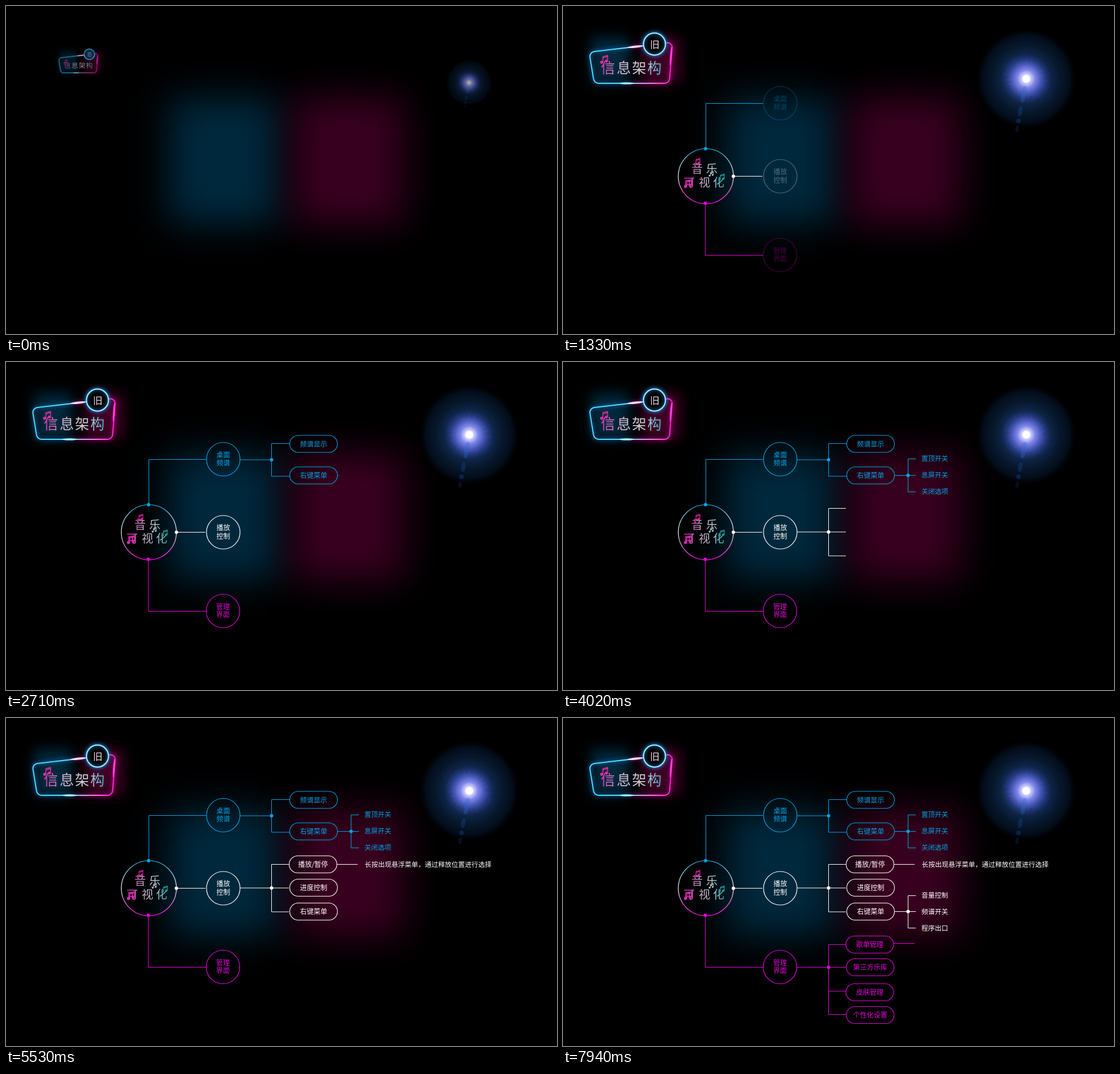
An HTML page with a canvas that plays this animation: 970x577 px, repeating every 8 s.

```html
<!DOCTYPE html>
<html lang="zh-CN">
<head>
<meta charset="utf-8">
<style>
html, body { margin: 0; width: 970px; height: 577px; overflow: hidden; background: #000; }
body { position: relative; }
canvas { position: absolute; left: 0; top: 0; }
.glow { position: absolute; top: 162px; width: 194px; height: 221px; filter: blur(32px); }
</style>
</head>
<body>
<div class="glow" style="left:286px;background:#00283c"></div>
<div class="glow" style="left:506px;background:#400024e0"></div>
<canvas id="stage" width="970" height="577"></canvas>
<script>
const ctx = document.getElementById('stage').getContext('2d');
const LOOP = 8000, FADE = 489, WIPE = 450, TAU = Math.PI * 2;
const BLUE = '#00a4e8', WHITE = '#ffffff', PINK = '#e600dc';
const FONT = '"Noto Sans CJK SC", "Noto Sans CJK", "Noto Sans", sans-serif';

const progress = (t, start, length) => Math.min(1, Math.max(0, (t - start) / length));

function gradient(x0, y0, x1, y1, ...colors) {
  const g = ctx.createLinearGradient(x0, y0, x1, y1);
  colors.forEach((c, i) => g.addColorStop(i / (colors.length - 1), c));
  return g;
}

function disc(x, y, r, fill) {
  ctx.fillStyle = fill;
  ctx.beginPath();
  ctx.arc(x, y, r, 0, TAU);
  ctx.fill();
}

function ring(x, y, r, stroke, width = 1.2) {
  ctx.strokeStyle = stroke;
  ctx.lineWidth = width;
  ctx.beginPath();
  ctx.arc(x, y, r, 0, TAU);
  ctx.stroke();
}

function text(str, x, y, fill, size = 11.75, align = 'center', weight = 400) {
  ctx.font = `${weight} ${size}px ${FONT}`;
  ctx.textAlign = align;
  ctx.textBaseline = 'alphabetic';
  ctx.fillStyle = fill;
  ctx.fillText(str, x, y + size * 0.37);
}

const spaced = (str, xs, y, fill, size) =>
  [...str].forEach((c, i) => text(c, xs[i], y, fill, size));

// Pair of beamed quavers centred on x, y
function note(x, y, s, color) {
  disc(x - s * 0.4, y + s * 0.5, s * 0.24, color);
  disc(x + s * 0.35, y + s * 0.3, s * 0.24, color);
  ctx.strokeStyle = color;
  ctx.lineWidth = s * 0.14;
  ctx.beginPath();
  ctx.moveTo(x - s * 0.2, y + s * 0.5);
  ctx.lineTo(x - s * 0.2, y - s * 0.4);
  ctx.lineTo(x + s * 0.55, y - s * 0.6);
  ctx.lineTo(x + s * 0.55, y + s * 0.3);
  ctx.moveTo(x - s * 0.2, y - s * 0.2);
  ctx.lineTo(x + s * 0.55, y - s * 0.4);
  ctx.stroke();
}

// Entrance that grows around a point while fading in
function zoom(p, x, y, draw) {
  if (p <= 0) return;
  const s = p ** 1.6;
  ctx.save();
  ctx.globalAlpha = p;
  ctx.translate(x, y);
  ctx.scale(s, s);
  ctx.translate(-x, -y);
  draw(s);
  ctx.restore();
}

function fade(p, draw) {
  if (p <= 0) return;
  ctx.save();
  ctx.globalAlpha = p;
  draw();
  ctx.restore();
}

// Left-to-right reveal: a paint that ends softly at the moving front
function wipe(p, x0, x1, color, lines, dot) {
  if (p <= 0) return;
  const front = x0 + (x1 - x0 + 6) * p;
  const paint = gradient(front - 6, 0, front, 0, color, color + '00');
  ctx.strokeStyle = paint;
  ctx.lineWidth = 1;
  ctx.beginPath();
  for (const [x, y, ...rest] of lines) {
    ctx.moveTo(x, y);
    for (let i = 0; i < rest.length; i += 2) ctx.lineTo(rest[i], rest[i + 1]);
  }
  ctx.stroke();
  if (dot) disc(...dot, 3, paint);
}

// Stem from x0 to a vertical bar, with one twig for each y
function branch(p, x0, stemY, barX, x1, ys, color) {
  const lines = ys.map(y => [barX, y, x1, y]);
  lines.push([x0, stemY, barX, stemY], [barX, ys[0], barX, ys[ys.length - 1]]);
  wipe(p, x0, x1, color, lines, [barX, stemY]);
}

function flare(x, y, length, thick, angle, color) {
  ctx.fillStyle = color;
  ctx.beginPath();
  ctx.ellipse(x, y, length, thick, angle, 0, TAU);
  ctx.fill();
}

function title(s) {
  ctx.filter = `blur(${11 * s}px)`;
  ctx.fillStyle = '#00283c';
  ctx.fillRect(50, 55, 66, 80);
  ctx.fillStyle = '#400024';
  ctx.fillRect(140, 55, 66, 80);
  ctx.filter = 'none';

  const neon = gradient(46, 0, 193, 0, '#4fdcff', '#4fdcff', '#6fe0ff', '#ff7be8', '#ff18d8');
  const path = () => {
    ctx.beginPath();
    ctx.moveTo(141, 70);
    ctx.arcTo(46, 81, 55, 136, 9);
    ctx.arcTo(55, 136, 187, 136, 9);
    ctx.arcTo(187, 136, 193, 64, 9);
    ctx.arcTo(193, 64, 181, 65, 8);
    ctx.lineTo(181, 65);
    ctx.stroke();
  };
  ctx.strokeStyle = neon;
  ctx.lineWidth = 2;
  for (const [x, width, glow] of [[0, 120, '#0090ff'], [120, 110, '#ff00c0']]) {
    ctx.save();
    ctx.beginPath();
    ctx.rect(x, 30, width, 125);
    ctx.clip();
    ctx.shadowColor = glow;
    ctx.shadowBlur = 7 * s;
    path();
    ctx.restore();
  }
  flare(128, 71.5, 15, 2, -0.11, '#ffd8f4');
  flare(112, 136, 13, 1.7, 0, '#a8f4ff');
  flare(190, 88, 17, 1.6, 1.65, '#ff40dc');

  ctx.save();
  ctx.shadowColor = '#00a8ff';
  ctx.shadowBlur = 7 * s;
  disc(161, 67, 19, '#000');
  ring(161, 67, 19.3, '#98e8ff', 2.2);
  ctx.restore();
  text('旧', 161.5, 67.5, gradient(153, 0, 170, 0, '#e0b8d8', '#f0f0f0'), 17);
  spaced('信息架构', [79, 107, 134, 161], 109,
    gradient(67, 0, 174, 0, '#e030b8', '#d8b8cc', '#d0d4d8', '#40b0cc'), 25);
  note(72.5, 93.5, 11, '#e0309c');
}

function star() {
  const x = 815.5, y = 128;
  const halo = ctx.createRadialGradient(x, y, 0, x, y, 87);
  [[0, '#fff'], [0.065, '#fff'], [0.1, '#c4c6ff'], [0.19, '#8088e0'], [0.29, '#4658b0'],
   [0.39, '#22387a'], [0.5, '#0f2548'], [0.68, '#07182c'], [0.88, '#030d1a'], [1, '#02081000']]
    .forEach(([at, color]) => halo.addColorStop(at, color));
  disc(x, y, 87, halo);

  const rays = ctx.createRadialGradient(x, y, 10, x, y, 56);
  rays.addColorStop(0, '#7078ff90');
  rays.addColorStop(1, '#3030c030');
  ctx.strokeStyle = rays;
  ctx.lineWidth = 0.8;
  ctx.beginPath();
  for (let i = 0; i < 72; i++) {
    const a = i / 72 * TAU;
    const r = 24 + 20 * Math.abs(Math.cos(a - 0.64)) ** 10 + 12 * Math.abs(Math.sin(i * 7.3));
    ctx.moveTo(x + 14 * Math.cos(a), y + 14 * Math.sin(a));
    ctx.lineTo(x + r * Math.cos(a), y + r * Math.sin(a));
  }
  ctx.stroke();

  flare(811, 155, 15, 5, 1.75, '#2868c850');
  flare(805, 185, 9, 4, 1.75, '#1848a050');
  disc(802, 202, 4, '#1848a060');
  flare(799.5, 216, 6, 3, 1.75, '#10307050');
}

function root() {
  ring(251.5, 299.5, 48.5, gradient(0, 251, 0, 348, '#20b8f0', '#ffffff', '#f000e0'), 1.2);
  const ink = gradient(216, 0, 286, 0, '#d820b8', '#c8a0c0', '#b8c8cc', '#20a8a8');
  spaced('音乐', [236, 262], 287, ink, 20);
  spaced('可视化', [222, 249, 274], 311, ink, 20);
  note(236, 273.5, 9, '#d020a0');
  note(261, 295, 7, '#a8c0c4');
  note(220, 312, 11, '#d828b0');
  note(279, 301, 9, '#209898');
}

function node(x, y, color, top, bottom) {
  ring(x, y, 29.5, color);
  text(top, x, y - 7.5, color, 12);
  text(bottom, x, y + 7, color, 12);
}

function pill(x, y, color, label) {
  ctx.strokeStyle = color;
  ctx.lineWidth = 1.1;
  ctx.beginPath();
  ctx.roundRect(x, y - 15, 84, 30, 15);
  ctx.stroke();
  text(label, x + 42, y + 0.3, color, 12, 'center', 500);
}

const labels = (rows, color) => rows.forEach(([str, y]) => text(str, 631, y, color, 11.75, 'left'));

function render(t) {
  const wiped = start => progress(t, start, WIPE);
  const faded = start => progress(t, start, FADE);
  ctx.clearRect(0, 0, 970, 577);

  // The first entrance stalls briefly, then lands at once
  const opening = progress(t < 190 ? Math.min(t, 40) : t, -305, FADE);
  zoom(opening, 134, 101, title);
  zoom(opening, 815, 141, star);
  zoom(faded(193), 251.5, 299.5, root);

  const trunk = progress(t, 690, FADE);
  wipe(trunk, 248, 352, BLUE, [[251.5, 251, 251.5, 171.5, 352, 171.5]], [251, 251]);
  wipe(trunk, 248, 352, WHITE, [[300, 299.5, 351, 299.5]], [300, 299.5]);
  wipe(trunk, 247, 352, PINK, [[250.5, 347, 250.5, 438.5, 352, 438.5]], [250.5, 347]);
  fade(faded(1175), () => {
    node(382.5, 171, BLUE, '桌面', '频谱');
    node(382.5, 299.5, WHITE, '播放', '控制');
    node(382, 438, PINK, '管理', '界面');
  });

  branch(wiped(1667), 412, 172, 467.5, 499, [143.5, 201], BLUE);
  fade(faded(2150), () => {
    pill(499.5, 144, BLUE, '频谱显示');
    pill(499.5, 199.5, BLUE, '右键菜单');
  });
  branch(wiped(2660), 584, 199.5, 607.5, 621, [170.5, 199.5, 228.5], BLUE);
  fade(faded(3110), () => labels([['置顶开关', 170], ['息屏开关', 198.5], ['关闭选项', 228]], BLUE));

  branch(wiped(3575), 412, 299, 467.5, 498, [257.5, 299, 341], WHITE);
  fade(faded(4090), () => {
    pill(498.5, 257.5, WHITE, '播放/暂停');
    pill(499.5, 298.5, WHITE, '进度控制');
    pill(499.5, 340.5, WHITE, '右键菜单');
  });
  wipe(wiped(4590), 583, 619, WHITE, [[583, 257.5, 619, 257.5]]);
  fade(faded(5055), () => text('长按出现悬浮菜单，通过释放位置进行选择', 631.5, 257.5, WHITE, 11.75, 'left'));
  branch(wiped(5560), 584, 340.5, 607.5, 621, [312.5, 340.5, 369.5], WHITE);
  fade(faded(6030), () => labels([['音量控制', 312], ['频谱开关', 340.5], ['程序出口', 369.5]], WHITE));

  branch(wiped(6536), 412, 438.5, 467.5, 498, [398.5, 438.5, 480.5, 521.5], PINK);
  fade(faded(7030), () => {
    pill(498, 398.5, PINK, '歌单管理');
    pill(498.8, 438.5, PINK, '第三方乐库');
    pill(498, 482.5, PINK, '皮肤管理');
    pill(498.8, 522.5, PINK, '个性化设置');
  });
  wipe(wiped(7505), 582, 619, PINK, [[582, 396.5, 619, 396.5]]);
}

const began = performance.now();
function tick() {
  render((performance.now() - began) % LOOP);
  requestAnimationFrame(tick);
}
tick();
</script>
</body>
</html>
```
